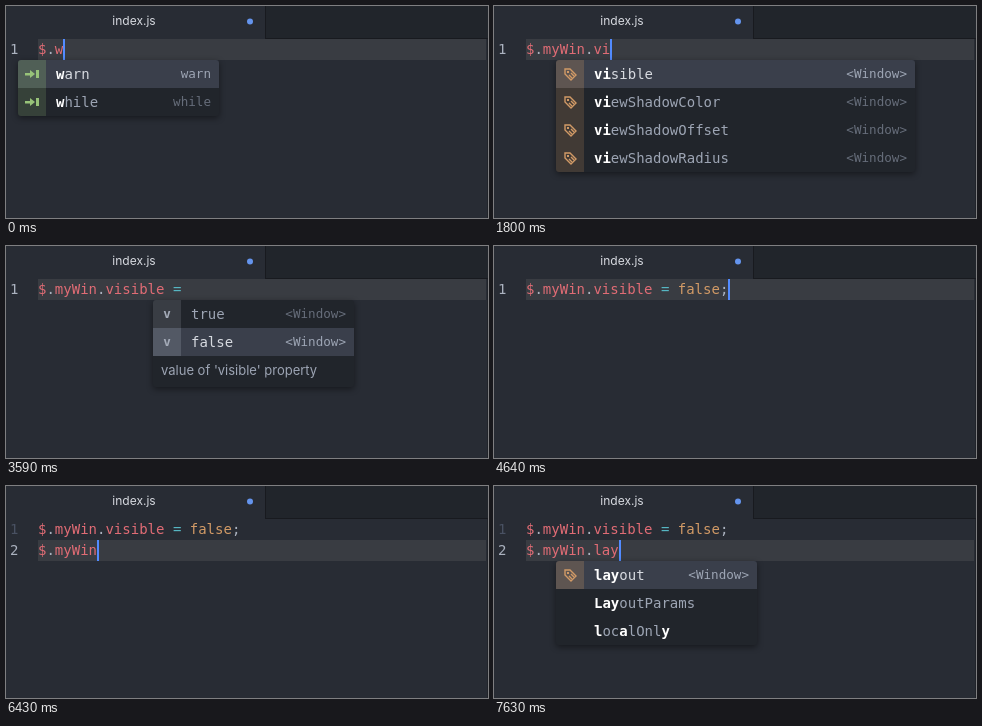
These frames come from a looping animation (482x212 px, 8000 ms). An HTML page with a canvas:

```html
<!DOCTYPE html>
<html lang="en">
<head>
<meta charset="utf-8">
<title>Editor autocomplete</title>
<style>
html, body { margin: 0; width: 100%; height: 100%; overflow: hidden; background: #282c34; }
canvas { display: block; width: 482px; height: 212px; }
</style>
</head>
<body>
<canvas id="stage"></canvas>
<script>
const W = 482, H = 212, LOOP = 8000;
const CHAR = 8.43, LEFT = 32, TOP = 33, LINE = 21, ROW = 28;
const MONO = '"DejaVu Sans Mono", monospace';
const SANS = 'Inter, sans-serif';
const RED = '#e06c75', GREY = '#abb2bf', CYAN = '#56b6c2', ORANGE = '#d19a66', GREEN = '#98c379';

const canvas = document.getElementById('stage');
const scale = window.devicePixelRatio || 1;
canvas.width = W * scale;
canvas.height = H * scale;
const ctx = canvas.getContext('2d');
ctx.scale(scale, scale);

// Popup contents: icon kind, anchor column, suggestions, typed prefix, extras
const list = (icon, col, names, typed = '', more = {}) =>
  ({ icon, col, typed, width: 201, sel: 0, items: names.split(' '), ...more });
const views = list('#', 2, 'myWin moreTab marketTab profileTab drawerMenu header');
const viewsM = list('#', 2, 'myWin moreTab marketTab drawerMenu', 'm');
const viewsMy = list('#', 2, 'myWin', 'my');
const win = { label: '<Window>', width: 359 };
const props = list('tag', 8,
  'accessibilityHidden accessibilityHint accessibilityLabel accessibilityValue anchorPoint animatedCenter', '', win);
const shadow = 'visible viewShadowColor viewShadowOffset viewShadowRadius';
const bool = { label: '<Window>', note: "value of 'visible' property" };
const lay = { label: '<Window>', labelled: 1 };

const call = '$.myWin', show = call + '.visible', done = show + ' = false;';

// Start time, lines, popup, cursor shown
const steps = [
  [0, ['$.w'], list('arrow', 2, 'warn while', 'w', { label: 'same' })],
  [150, ['$.'], views],
  [300, ['$.m'], viewsM],
  [450, ['$.my'], viewsMy],
  [750, ['$.my'], viewsMy, false],
  [900, [call]],
  [1050, [call + '.']],
  [1350, [call + '.'], props],
  [1650, [call + '.v'], list('tag', 8, shadow + ' navTintColor verticalAlign', 'v', win)],
  [1800, [call + '.vi'], list('tag', 8, shadow, 'vi', win)],
  [1950, [call + '.vis'], list('tag', 8, shadow, 'vis', { ...win, width: 252 })],
  [2100, [call + '.visi'], list('tag', 8, 'visible viewShadowRadius', 'visi', { ...win, width: 252 })],
  [2540, [show]],
  [2990, [show + ' ']],
  [3140, [show + ' =']],
  [3290, [show + ' = '], list('v', 18, 'true false', '', bool)],
  [3590, [show + ' = '], list('v', 18, 'true false', '', { ...bool, sel: 1 }), false],
  [4040, [show + ' = false']],
  [4640, [done]],
  [4940, [done, '']],
  [5230, [done, '$']],
  [5380, [done, '$.']],
  [5530, [done, '$.'], views],
  [5680, [done, '$.m'], viewsM],
  [5830, [done, '$.my'], viewsMy],
  [6280, [done, '$.my'], viewsMy, false],
  [6430, [done, call]],
  [6880, [done, call], null, false],
  [7030, [done, call + '.']],
  [7330, [done, call + '.'], props],
  [7480, [done, call + '.la'], list('tag', 8, 'layout LayoutParams localOnly label', 'la', lay)],
  [7630, [done, call + '.lay'], list('tag', 8, 'layout LayoutParams localOnly', 'lay', lay)]
];

function rect(x, y, w, h, color) {
  ctx.fillStyle = color;
  ctx.fillRect(x, y, w, h);
}

function text(str, x, y, color, font, align = 'left') {
  ctx.font = font;
  ctx.fillStyle = color;
  ctx.textAlign = align;
  ctx.fillText(str, x, y);
}

function drawTabs() {
  rect(0, 0, W, H, '#282c34');
  rect(260, 0, W - 260, TOP, '#21252b');
  rect(259, 0, 1, TOP, '#181a1f');
  rect(260, TOP - 1, W - 260, 1, '#181a1f');
  rect(481, TOP, 1, H, '#202329');
  text('index.js', 128, 19, '#d7dae0', '12px ' + SANS, 'center');
  ctx.fillStyle = '#6494ed';
  ctx.beginPath();
  ctx.arc(244, 15.5, 3, 0, 7);
  ctx.fill();
}

function tokenColor(token) {
  if (token === 'false') return ORANGE;
  if (token === '=') return CYAN;
  return /[.;]/.test(token) ? GREY : RED;
}

function drawCode(lines, cursor) {
  const font = '14px ' + MONO, last = lines.length - 1;
  rect(LEFT, TOP + last * LINE, 448, LINE, '#393c42');
  lines.forEach((line, i) => {
    const y = TOP + i * LINE + 15;
    text(i + 1, 4, y, i === last ? GREY : '#495162', font);
    for (const m of line.matchAll(/[\w$]+|[^\w\s]/g))
      text(m[0], LEFT + m.index * CHAR, y, tokenColor(m[0]), font);
  });
  if (cursor) rect(Math.round(LEFT + lines[last].length * CHAR), TOP + last * LINE, 2, LINE, '#528bff');
}

function drawIcon(kind, x, y, active) {
  const color = { arrow: GREEN, tag: ORANGE, '#': '#858c99', v: '#a4abb8' }[kind];
  ctx.globalAlpha = active ? 0.24 : 0.18;
  rect(x, y, 28, ROW, color);
  ctx.globalAlpha = 1;
  const cx = x + 14, cy = y + 14;
  ctx.strokeStyle = color;
  if (kind === 'arrow') {
    rect(cx - 7, cy - 1, 6, 2.5, color);
    rect(cx + 4, cy - 4, 3, 8, color);
    ctx.beginPath();
    ctx.moveTo(cx - 2, cy - 4);
    ctx.lineTo(cx + 3, cy);
    ctx.lineTo(cx - 2, cy + 4);
    ctx.fill();
  } else if (kind === 'tag') {
    ctx.lineWidth = 1.4;
    ctx.beginPath();
    ctx.moveTo(cx - 5, cy - 5);
    ctx.lineTo(cx, cy - 5);
    ctx.lineTo(cx + 6, cy + 1);
    ctx.lineTo(cx + 1, cy + 6);
    ctx.lineTo(cx - 5, cy);
    ctx.closePath();
    ctx.stroke();
    rect(cx - 3, cy - 3, 2, 2, color);
    ctx.beginPath();
    ctx.moveTo(cx - 1, cy + 1);
    ctx.lineTo(cx + 2, cy + 4);
    ctx.moveTo(cx + 1, cy - 1);
    ctx.lineTo(cx + 4, cy + 2);
    ctx.stroke();
  } else {
    text(kind, cx, cy + 4, color, (kind === 'v' ? 'bold ' : '') + '12.6px ' + MONO, 'center');
  }
}

// Letters matching the typed prefix, in order, are bold
function drawName(name, typed, x, y, active) {
  let hit = 0;
  [...name].forEach((c, i) => {
    const match = hit < typed.length && c.toLowerCase() === typed[hit];
    if (match) hit++;
    const color = match ? '#ffffff' : active ? '#d7dae0' : '#9da5b4';
    text(c, x + i * CHAR, y, color, (match ? 'bold ' : '') + '14px ' + MONO);
  });
}

function drawPopup(p, line) {
  const x = Math.round(LEFT + p.col * CHAR) - 37, y = TOP + (line + 1) * LINE;
  const h = p.items.length * ROW + (p.note ? 31 : 0);
  ctx.save();
  ctx.shadowColor = 'rgba(0,0,0,.45)';
  ctx.shadowBlur = 6 * scale;
  ctx.shadowOffsetY = 2 * scale;
  ctx.fillStyle = '#21252b';
  ctx.beginPath();
  ctx.roundRect(x, y, p.width, h, 3);
  ctx.fill();
  ctx.restore();
  ctx.save();
  ctx.clip();
  p.items.forEach((name, i) => {
    const top = y + i * ROW, active = i === p.sel;
    const full = !p.labelled || i < p.labelled;
    if (active) rect(x, top, p.width, ROW, '#3a3f4b');
    if (full) drawIcon(p.icon, x, top, active);
    drawName(name, p.typed, x + 38, top + 19, active);
    if (p.label && full)
      text(p.label === 'same' ? name : p.label, x + p.width - 8, top + 18,
        active ? '#9da5b4' : '#666d7a', '12.6px ' + MONO, 'right');
  });
  if (p.note) text(p.note, x + 8, y + h - 12, '#9da5b4', '13px ' + SANS);
  ctx.restore();
}

function draw(now) {
  const t = now % LOOP;
  const [, lines, popup, cursor = true] = steps.findLast(s => s[0] <= t);
  drawTabs();
  drawCode(lines, cursor);
  if (popup) drawPopup(popup, lines.length - 1);
}

const start = performance.now();
function tick() {
  draw(performance.now() - start);
  requestAnimationFrame(tick);
}
tick();
</script>
</body>
</html>
```
